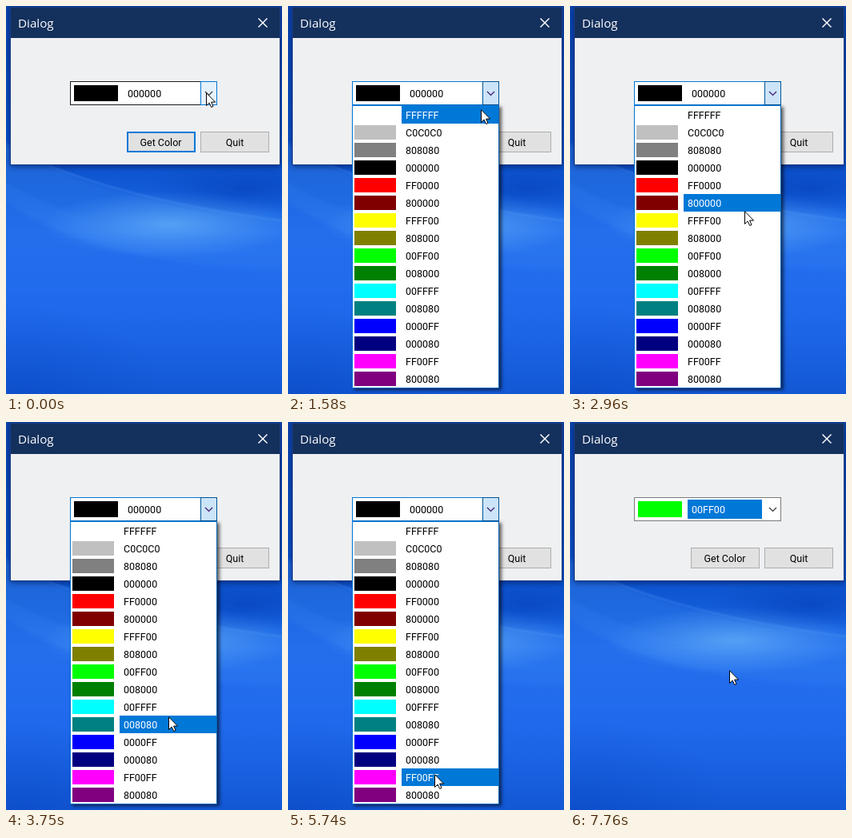
An HTML page with a canvas for the animation above (8000 ms loop, 345 px wide and 485 px high).

```html
<!DOCTYPE html>
<html lang="en">
<head>
<meta charset="utf-8">
<title>Color combo box</title>
<style>
  html, body { margin: 0; width: 100%; height: 100%; overflow: hidden; background: #1459d6; }
  canvas { display: block; }
</style>
</head>
<body>
<canvas id="stage" width="345" height="485"></canvas>
<script>
const W = 345, H = 485, LOOP = 8000;
const OPEN = 790, CLOSE = 7450;
const BLUE = '#0078d7';
const UI_FONT = '12.5px Roboto, sans-serif';
const COLORS = ['FFFFFF', 'C0C0C0', '808080', '000000', 'FF0000', '800000', 'FFFF00', '808000',
  '00FF00', '008000', '00FFFF', '008080', '0000FF', '000080', 'FF00FF', '800080'];
const LIST = { x: 80, y: 124, w: 184, h: 354, row: 22 };

// Pointer moves: first step, last step, number of steps, end x, end y
const START = [250, 108];
const MOVES = [
  [1580, 1580, 1, 241, 129],
  [1760, 2500, 14, 227, 194],
  [2600, 2960, 9, 218, 256],
  [3005, 3370, 9, 209, 343],
  [3420, 3750, 8, 203, 368],
  [3800, 4210, 9, 196, 402],
  [4340, 4440, 3, 194, 416],
  [4620, 5180, 10, 186, 464],
  [5510, 5740, 6, 183, 440],
  [5790, 6050, 6, 184, 414],
  [6200, 6380, 5, 187, 394],
  [6560, 6940, 7, 195, 321],
  [7000, 7170, 4, 199, 310]
];

const ctx = document.getElementById('stage').getContext('2d');

// Share of a stepped change that is done at time t
function stepped(t, from, to, n) {
  if (t < from) return 0;
  if (t >= to) return 1;
  return (Math.floor((t - from) * (n - 1) / (to - from) + 1e-6) + 1) / n;
}

function pointerAt(t) {
  let [x, y] = START;
  for (const [from, to, n, ex, ey] of MOVES) {
    const p = stepped(t, from, to, n);
    x += (ex - x) * p;
    y += (ey - y) * p;
    if (p < 1) break;
  }
  return [Math.round(x), Math.round(y)];
}

function rect(c, x, y, w, h, fill) {
  c.fillStyle = fill;
  c.fillRect(x, y, w, h);
}

function box(c, x, y, w, h, fill, border, line = 1) {
  rect(c, x, y, w, h, border);
  rect(c, x + line, y + line, w - 2 * line, h - 2 * line, fill);
}

function text(c, s, x, y, color = '#000', font = UI_FONT, align = 'left') {
  c.font = font;
  c.fillStyle = color;
  c.textAlign = align;
  c.fillText(s, x, y);
}

function polyline(c, points, color, width) {
  c.beginPath();
  points.forEach(([x, y]) => c.lineTo(x, y));
  c.strokeStyle = color;
  c.lineWidth = width;
  c.stroke();
}

function shadow(c, color, blur, dx, dy) {
  c.shadowColor = color;
  c.shadowBlur = blur;
  c.shadowOffsetX = dx;
  c.shadowOffsetY = dy;
}

function glow(c, x, y, rx, ry, rgb, alpha) {
  c.save();
  c.translate(x, y);
  c.scale(rx, ry);
  const g = c.createRadialGradient(0, 0, 0, 0, 0, 1);
  g.addColorStop(0, `rgba(${rgb},${alpha})`);
  g.addColorStop(0.5, `rgba(${rgb},${alpha * 0.45})`);
  g.addColorStop(1, `rgba(${rgb},0)`);
  rect(c, -1, -1, 2, 2, g);
  c.restore();
}

// Soft area under a curve that falls from the left to the right edge
function sweep(c, y0, yc, y1, depth, rgb, alpha) {
  const g = c.createLinearGradient(0, y1 - 60, 0, y1 + depth);
  g.addColorStop(0, `rgba(${rgb},${alpha})`);
  g.addColorStop(1, `rgba(${rgb},0)`);
  c.beginPath();
  c.moveTo(-10, y0);
  c.quadraticCurveTo(110, yc, W + 10, y1);
  c.lineTo(W + 10, H);
  c.lineTo(-10, H);
  c.fillStyle = g;
  c.fill();
}

function paintWallpaper(c) {
  const g = c.createLinearGradient(0, 0, 0, H);
  [[0, '#0a41aa'], [0.4, '#0b50cb'], [0.5, '#1560dd'], [0.58, '#2672ee'],
   [0.72, '#2570f0'], [0.86, '#1c65e6'], [1, '#1257d4']].forEach(([p, v]) => g.addColorStop(p, v));
  rect(c, 0, 0, W, H, g);
  c.filter = 'blur(2px)';
  sweep(c, 165, 245, 268, 70, '70,145,245', 0.3);
  sweep(c, 215, 290, 306, 60, '55,130,245', 0.22);
  sweep(c, 240, 325, 332, 110, '20,90,230', 0.3);
  c.filter = 'none';
  glow(c, 205, 273, 160, 42, '115,190,250', 0.6);
  glow(c, 300, 228, 130, 34, '4,58,180', 0.55);
  glow(c, 10, 485, 190, 110, '6,66,190', 0.4);
  c.filter = 'blur(1px)';
  c.beginPath();
  c.moveTo(40, 194);
  c.quadraticCurveTo(160, 245, 350, 269);
  c.strokeStyle = 'rgba(90,160,250,.35)';
  c.lineWidth = 2;
  c.stroke();
  c.filter = 'none';
}

function paintDialog(c) {
  c.save();
  shadow(c, 'rgba(0,20,80,.6)', 7, 0, 2);
  rect(c, 5, 1, 338, 198, '#173f86');
  c.restore();
  rect(c, 6, 2, 336, 38, '#14305c');
  rect(c, 6, 40, 336, 158, '#eff0f2');
  text(c, 'Dialog', 15, 27, '#fff', '15.2px "Open Sans", "Noto Sans", sans-serif');
  polyline(c, [[315.5, 15.5], [326.5, 26.5]], '#fff', 1.4);
  polyline(c, [[326.5, 15.5], [315.5, 26.5]], '#fff', 1.4);
  box(c, 243, 157, 86, 26, '#e1e1e1', '#adadad');
  text(c, 'Quit', 286, 175, '#000', UI_FONT, 'center');
}

const scene = document.createElement('canvas');
scene.width = W;
scene.height = H;
paintWallpaper(scene.getContext('2d'));
paintDialog(scene.getContext('2d'));

function drawCombo(t) {
  const isOpen = t >= OPEN && t < CLOSE, done = t >= CLOSE;
  const value = done ? '00FF00' : '000000';
  box(ctx, 80, 94, 184, 30, '#fff', isOpen ? BLUE : done ? '#7a7a7a' : '#1c1c1c');
  rect(ctx, 85, 99, 55, 20, '#' + value);
  if (done) rect(ctx, 147, 97, 93, 24, BLUE);
  text(ctx, value, 152, 114, done ? '#fff' : '#000');
  ctx.globalAlpha = 1 - stepped(t, CLOSE, 7760, 6);
  box(ctx, 243, 94, 21, 30, isOpen ? '#cce4f7' : '#e5f1fb', isOpen ? '#005499' : BLUE);
  ctx.globalAlpha = 1;
  polyline(ctx, [[249, 107], [253.5, 111.5], [258, 107]], isOpen ? '#3c1470' : '#333', 1.2);
}

function drawList(t, pointerY) {
  const { x, y, w, h, row } = LIST;
  const shown = stepped(t, OPEN, 970, 5);
  const active = t < 1580 ? 3 : Math.floor((pointerY - y - 1) / row);
  ctx.save();
  if (shown < 1) {
    ctx.beginPath();
    ctx.rect(x, y, w, h);
    ctx.clip();
    ctx.translate(0, Math.round(h * (shown - 1)));
  }
  ctx.save();
  shadow(ctx, 'rgba(0,0,0,.6)', 4, 3, 2);
  rect(ctx, x, y, w, h, BLUE);
  ctx.restore();
  box(ctx, x, y, w, h, '#fff', '#0a64b4');
  rect(ctx, x, y, 1, h, BLUE);
  rect(ctx, x, y, w, 1, BLUE);
  COLORS.forEach((name, i) => {
    const top = y + 1 + i * row;
    rect(ctx, 83, top + 2, 52, 18, '#' + name);
    if (i === active) rect(ctx, 142, top, 121, row, BLUE);
    text(ctx, name, 147, top + 16, i === active ? '#fff' : '#000');
  });
  ctx.restore();
}

function drawPointer(x, y) {
  ctx.save();
  ctx.translate(x, y);
  ctx.beginPath();
  [[0.5, 0.8], [0.5, 16.5], [4.1, 13.1], [6.7, 18.5], [9, 17.5], [6.6, 12.1], [11.6, 12.1]]
    .forEach(([px, py]) => ctx.lineTo(px, py));
  ctx.closePath();
  ctx.fillStyle = '#fff';
  ctx.fill();
  ctx.strokeStyle = '#000';
  ctx.lineWidth = 1;
  ctx.stroke();
  ctx.restore();
}

function draw(t) {
  const [px, py] = pointerAt(t);
  ctx.drawImage(scene, 0, 0);
  const isDefault = t < CLOSE;
  box(ctx, 151, 157, 86, 26, '#e1e1e1', isDefault ? BLUE : '#adadad', isDefault ? 2 : 1);
  text(ctx, 'Get Color', 193.5, 175, '#000', UI_FONT, 'center');
  drawCombo(t);
  if (t >= OPEN && t < CLOSE) drawList(t, py);
  drawPointer(px, py);
}

const begin = performance.now();
function tick() {
  draw((performance.now() - begin) % LOOP);
  requestAnimationFrame(tick);
}
tick();
</script>
</body>
</html>
```
